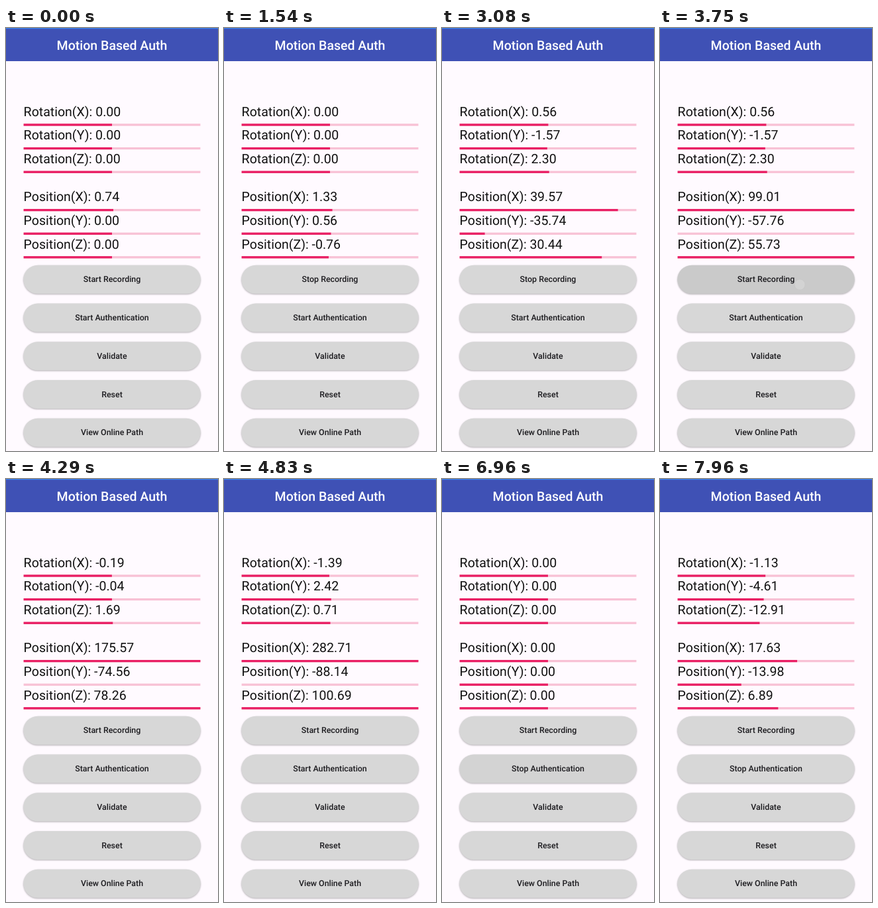
These frames come from a looping animation (320x638 px, 8000 ms). An HTML page:

```html
<!DOCTYPE html>
<html lang="en">
<head>
<meta charset="utf-8">
<title>Motion Based Auth</title>
<style>
  html, body { margin: 0; width: 100%; height: 100%; overflow: hidden; background: #fffaff; }
  svg { display: block; width: 320px; height: 638px; font-family: Roboto, sans-serif; text-rendering: geometricPrecision; }
  .title { font-size: 19.5px; font-weight: 500; fill: #fff; text-anchor: middle; }
  .reading { font-size: 19.55px; fill: #111; }
  .label { font-size: 12.4px; font-weight: 500; fill: #1c1b1f; text-anchor: middle; }
  .button { filter: drop-shadow(0 1px 1px rgba(0, 0, 0, .3)); }
</style>
</head>
<body>
<svg id="stage" viewBox="0 0 320 638"></svg>
<script>
// All times below count ticks of the 24 Hz display.
const RATE = 24, LOOP_MS = 8000;
const RECORD = 23, STOP = 89, RESET = 148, AUTH = 161;
const AUTH_MOVE = 168, LAST = 191;
const LEFT = 26.6, WIDTH = 266.8, BUTTON_PITCH = 57.75;
const stage = document.getElementById('stage');

const clamp = x => Math.max(0, Math.min(1, x));
const progress = (t, from, to) => clamp((t - from) / (to - from));
const ease = u => u * u * (3 - 2 * u);

function add(tag, attrs, text = '') {
  const node = document.createElementNS('http://www.w3.org/2000/svg', tag);
  for (const name in attrs) node.setAttribute(name, attrs[name]);
  node.textContent = text;
  return stage.appendChild(node);
}

// Rotation eases from rest to one tilt, holds, then eases to the next.
const rotation = (first, second) => t =>
  first * ease(progress(t, 52, 68)) + (second - first) * ease(progress(t, 95, 114));

// Position creeps at first, then follows the cubic through four moments.
const moments = [37, 74, 90, 116];
const position = (start, ...points) => t => {
  if (t < moments[0]) return start + (points[0] - start) * (t / moments[0]) ** 2;
  return points.reduce((sum, point, i) => sum + moments.reduce(
    (term, m, j) => j === i ? term : term * (t - m) / (moments[i] - m), point), 0);
};

add('rect', { width: 320, height: 50, fill: '#3f51b5' });
add('rect', { width: 320, height: 1.2, fill: '#3983ee' });
add('text', { x: 160, y: 33, class: 'title' }, 'Motion Based Auth');

const meters = [
  { name: 'Rotation(X)', move: rotation(0.56, -1.39), end: -1.13 },
  { name: 'Rotation(Y)', move: rotation(-1.57, 2.42), end: -4.61 },
  { name: 'Rotation(Z)', move: rotation(2.3, 0.71), end: -12.91 },
  { name: 'Position(X)', move: position(0.74, 1.33, 39.57, 99.01, 282.71), end: 17.63 },
  { name: 'Position(Y)', move: position(0, 0.56, -35.74, -57.76, -88.14), end: -13.98 },
  { name: 'Position(Z)', move: position(0, -0.76, 30.44, 55.73, 100.69), end: 6.89 }
].map((meter, i) => {
  const isPosition = i > 2;
  const y = 146 + i * 35.6 + (isPosition ? 21.8 : 0);
  const bar = { x: LEFT, y: y - 1.65, width: WIDTH, height: 3.3 };
  const text = add('text', { x: LEFT, y: y - 13.15, class: 'reading' });
  add('rect', { ...bar, fill: '#f8c1d5' });
  return { ...meter, text, fill: add('rect', { ...bar, fill: '#e91e63' }), range: isPosition ? 50 : 180 };
});

const buttons = ['Start Recording', 'Start Authentication', 'Validate', 'Reset', 'View Online Path']
  .map((name, i) => {
    const y = 379.3 + i * BUTTON_PITCH;
    const face = add('rect', { x: LEFT - 0.3, y: y - 21.5, width: WIDTH + 0.6, height: 43, rx: 21.5, class: 'button' });
    return { face, label: add('text', { x: 160, y: y + 4.1, class: 'label' }, name) };
  });

const finger = add('circle', { cx: 211, r: 8, fill: '#fff', 'fill-opacity': 0.18, stroke: '#aaa', 'stroke-opacity': 0.2, 'stroke-width': 0.8 });

const taps = [
  { button: 0, time: RECORD },
  { button: 0, time: STOP },
  { button: 3, time: RESET },
  { button: 1, time: AUTH }
];

function draw(t) {
  for (const { name, move, end, range, text, fill } of meters) {
    const value = t < RESET ? move(t) : end * progress(t, AUTH_MOVE, LAST) ** 2;
    text.textContent = `${name}: ${value.toFixed(2).replace('-0.00', '0.00')}`;
    fill.setAttribute('width', WIDTH * clamp(0.5 + value / (2 * range)));
  }

  buttons[0].label.textContent = `${t >= RECORD && t < STOP ? 'Stop' : 'Start'} Recording`;
  buttons[1].label.textContent = `${t >= AUTH ? 'Stop' : 'Start'} Authentication`;

  // A press darkens the button for two ticks before its tap, then fades.
  const press = buttons.map(() => 0);
  finger.style.display = 'none';
  for (const { button, time } of taps) {
    const age = t - time;
    press[button] += progress(age, -2, 0) - progress(age, 1, 8);
    if (age >= -2 && age < 2) {
      finger.style.display = '';
      finger.setAttribute('cy', 387 + button * BUTTON_PITCH);
    }
  }
  buttons.forEach(({ face }, i) => {
    const grey = 214.5 - 13 * press[i];
    face.setAttribute('fill', `rgb(${grey}, ${grey}, ${grey})`);
  });
}

function frame() {
  // Ticks show on a 10 ms grid, so each may appear just before its exact time.
  const ms = performance.now() % LOOP_MS;
  draw(Math.min(LAST, Math.floor((ms + 9) * RATE / 1000)));
  requestAnimationFrame(frame);
}
frame();
</script>
</body>
</html>
```
